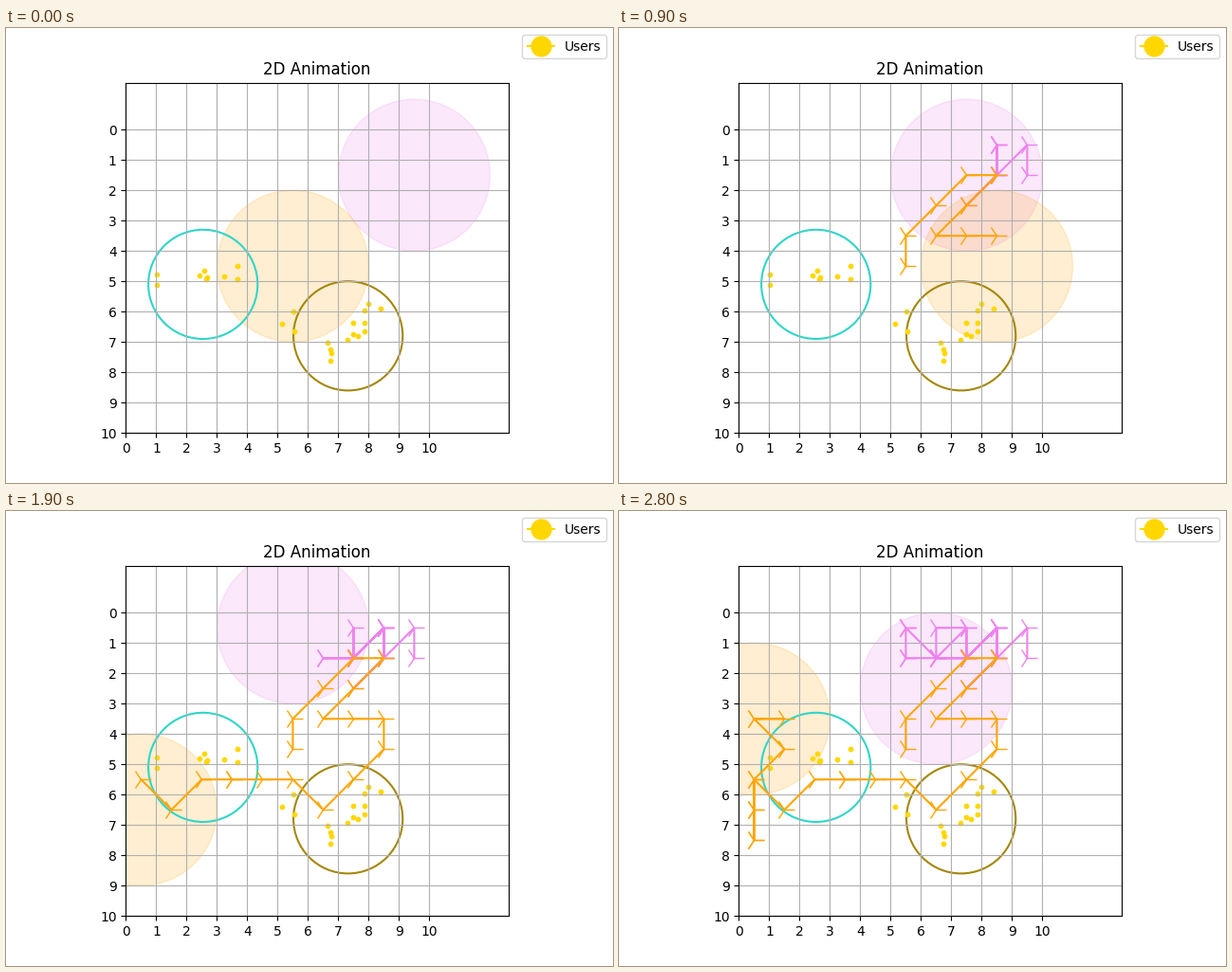
These frames come from a looping animation (640 by 480 pixels, 2.9 s). A matplotlib script:

```python
import matplotlib.pyplot as plt
from matplotlib.animation import FuncAnimation
from matplotlib.lines import Line2D
from matplotlib.patches import Circle
import numpy as np

FRAMES = 29
REACH = 2.5
CLUSTER_RADIUS = 1.8
MARGIN = 0.05
COMPASS = {"N": (0, -1), "S": (0, 1), "E": (1, 0), "W": (-1, 0)}

# Centre and size of each small group of users.
GROUPS = [
    ((0.65, 5.1), 2), ((2.35, 4.9), 4), ((3.3, 4.6), 3), ((5.4, 6.3), 3),
    ((6.75, 7.25), 4), ((7.5, 6.6), 5), ((8.1, 6.0), 4),
]
CLUSTERS = [((2.54, 5.1), "#30d5c8"), ((7.32, 6.8), "#a4870a")]


def scatter_users(spread=0.4):
    rng = np.random.default_rng(4)
    return np.vstack([center + rng.uniform(-spread, spread, (count, 2))
                      for center, count in GROUPS])


def step(move):
    """Unit step for a compass heading; '-' stays in place."""
    return sum((np.array(COMPASS[c]) for c in move if c != "-"), np.zeros(2))


def walk(start, moves):
    return np.cumsum([start] + [step(m) for m in moves.split()], axis=0)


class Drone:
    def __init__(self, ax, color, start, moves):
        self.path = walk(start, moves)
        self.area = ax.add_patch(
            Circle(start, REACH, color=color, alpha=0.18))
        self.trail, = ax.plot([], [], color=color, marker="4", markersize=16)

    def move(self, i):
        self.area.center = tuple(self.path[i])
        # The trail stops at the previous position.
        self.trail.set_data(self.path[:i, 0], self.path[:i, 1])
        return [self.area, self.trail]


fig, ax = plt.subplots(figsize=(6.4, 4.8), dpi=100)
ax.set_title("2D Animation")

drones = [
    Drone(ax, "violet", (9.5, 1.5),
          "N SW SW NE N S N - SW NE SW N S - - W E W NW "
          "- - S - E NE W S S"),
    Drone(ax, "orange", (5.5, 4.5),
          "N NE NE E SW SW E E S SW SW NW W W - W SW NW S "
          "S - N N NE NW E W -"),
]

for center, color in CLUSTERS:
    ax.add_patch(Circle(center, CLUSTER_RADIUS, fill=False,
                        edgecolor=color, linewidth=1.5))
ax.scatter(*scatter_users().T, s=10, color="gold")

ax.set_aspect("equal")
ax.set_xlim(0, 12 + 12 * MARGIN)
ax.set_ylim(10, -1 - 11 * MARGIN)
ax.set_xticks(range(11))
ax.set_yticks(range(11))
ax.grid(True)

key = Line2D([], [], color="gold", marker="o", markersize=15, label="Users")
fig.legend(handles=[key])


def update(i):
    return [artist for drone in drones for artist in drone.move(i)]


anim = FuncAnimation(fig, update, frames=FRAMES, interval=100,
                     init_func=lambda: update(0), repeat=True,
                     repeat_delay=0, blit=False)
plt.show()
```
